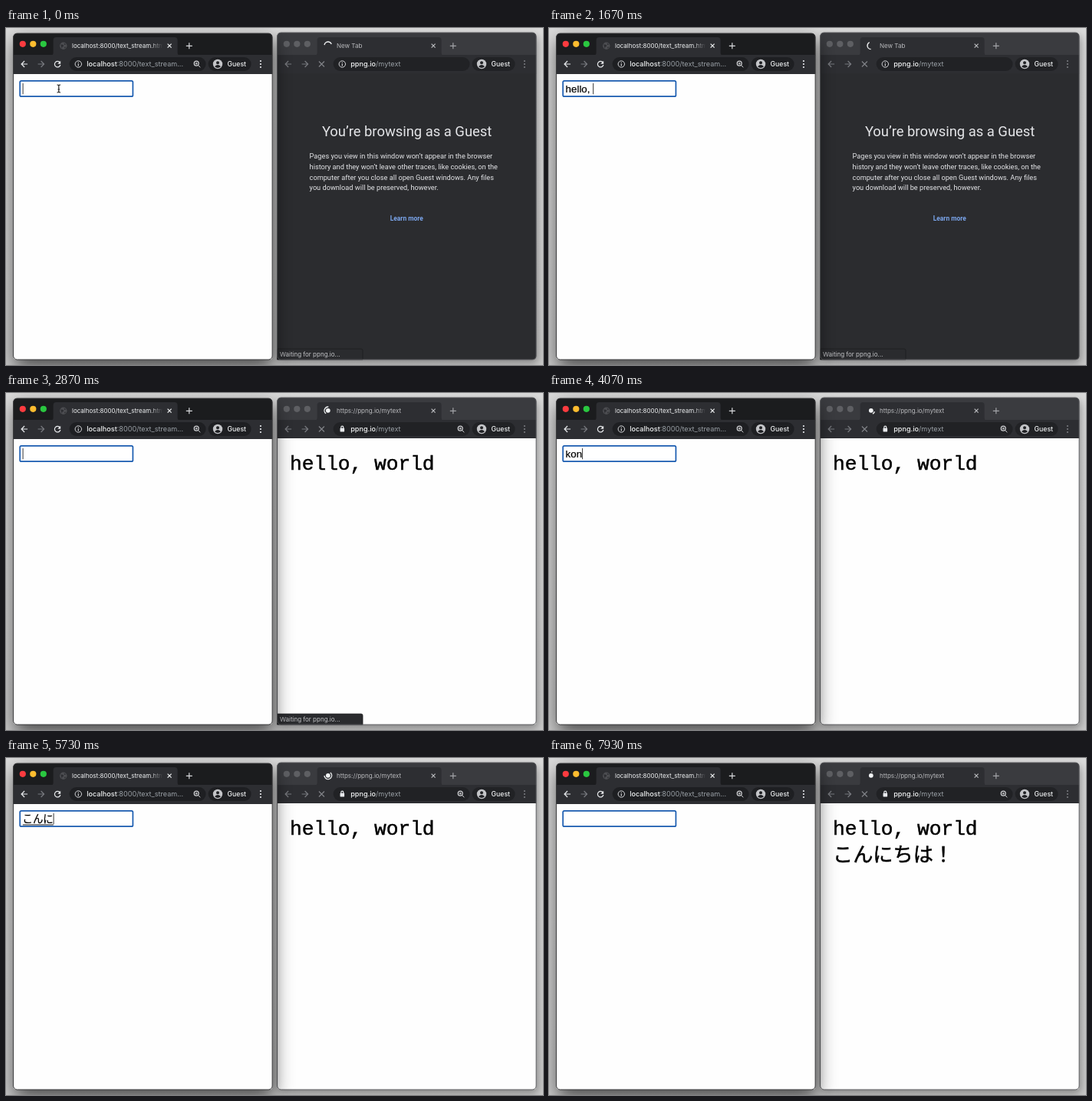
Animation of 700x439 px, one loop 8000 ms. Source, as an HTML page:

```html
<!DOCTYPE html>
<html lang="en">
<head>
<meta charset="utf-8">
<title>Text stream</title>
<style>
html, body { margin: 0; width: 100%; height: 100%; overflow: hidden; background: #d6d6d6; }
svg { display: block; width: 100%; height: 100%; }
text { white-space: pre; font-family: Inter, sans-serif; }
.tab { font-size: 8px; }
.url { font-size: 9.1px; fill: #9aa0a6; }
.strong { font-weight: 500; fill: #f1f3f4; }
.line { fill: none; stroke-width: 1.2; }
.guest text { font-family: Roboto, sans-serif; fill: #e4e5e8; font-size: 9.2px; }
.guest .title { font-size: 18.4px; }
.guest .link { font-size: 8.4px; font-weight: 600; fill: #7ba6ec; }
#typed { font: 13.33px "Liberation Sans", "Noto Sans CJK JP", sans-serif; stroke: #000; stroke-width: .2; }
.output { font: 26.2px "Liberation Mono", "Noto Sans CJK JP", monospace; stroke: #000; stroke-width: .5; }
</style>
</head>
<body>
<svg id="stage" viewBox="0 0 700 439"></svg>
<script>
const LOOP = 8000;
const NAVIGATE = 2730, FIRST_LINE = 2860, STATUS_HIDE = 3330, SECOND_LINE = 7270;

// Each entry: [time, field text, being composed]
const typing = (start, step, states, composing = false) =>
  states.map((text, i) => [start + i * step, text, composing]);
const prefixes = text => [...text].map((_, i) => text.slice(0, i + 1));
const keys = [
  [0, ''],
  ...typing(800, 133, prefixes('hello, world')),
  [2665, ''],
  ...typing(3730, 133, prefixes('kon')),
  ...typing(4460, 100, ['ko', 'k', '']),
  ...typing(5060, 140, ['k', 'こ', 'こn', 'こんn', 'こんに', 'こんにc', 'こんにch', 'こんにち'], true),
  ...typing(6260, 160, ['こんにちh', 'こんにちは', 'こんにちは！'], true),
  [7060, 'こんにちは！'],
  [7250, '']
];

const dark = '#2d2e32';

const cross = (x, y, r, color) =>
  `<path class="line" stroke="${color}" d="M${x - r} ${y - r}l${2 * r} ${2 * r}m0 ${-2 * r}l${-2 * r} ${2 * r}"/>`;

const backArrow = color =>
  `<path class="line" stroke="${color}" d="M10.5 47h8m-4 -4l-4 4l4 4"/>`;

const forwardArrow = color =>
  `<path class="line" stroke="${color}" d="M32 47h8m-4 -4l4 4l-4 4"/>`;

const infoIcon = `<g class="line" stroke="#d4d5d8"><circle cx="84.7" cy="47" r="4.2" stroke-width="1"/>
  <path d="M84.7 46.4v3M84.7 44.4v1.1"/></g>`;

const lockIcon = `<rect x="81.9" y="45.8" width="5.6" height="4.6" rx=".6" fill="#e8eaed"/>
  <path class="line" stroke="#e8eaed" stroke-width="1" d="M83.2 46v-1.3a1.5 1.5 0 0 1 3 0V46"/>`;

const zoomIcon = `<g class="line" stroke="#cfd0d3"><circle cx="238.6" cy="46.2" r="3"/>
  <path d="M240.9 48.5l2.8 2.8M237.1 46.2h3M238.6 44.7v3" stroke-width="1"/></g>`;

const reloadIcon = `<path class="line" stroke="#e8eaed" d="M60.8 45.1A3.8 3.8 0 1 0 61.3 48"/>
  <path fill="#e8eaed" d="M61.6 42.8v3.9h-3.9z"/>`;

const globe = `<circle cx="65.2" cy="23.3" r="4.7" fill="#4c4d51"/>
  <path fill="${dark}" d="M61.7 21.5l3 .3l1 1.6l-2 1.3l-.6 2zM66.2 19.5l2.4 2l-2.2 .6zM66.2 25l2.5 -.6l-1.4 2.4z"/>`;

const pagePath = top => `M0 ${top}H337.5V428q0 4 -4 4H4q-4 0 -4 -4z`;

function browser({ x, top, pageTop, active, page, tab, address }) {
  const strong = active ? '#f1f3f4' : '#b9babd';
  const weak = '#77797e';
  const icon = active ? '#e8eaed' : weak;
  const pill = active ? '#1e1f22' : '#212225';
  const lights = active ? ['#fc3b3f', '#fdbc2f', '#2ac740'] : Array(3).fill('#5e5f63');
  return `<g transform="translate(${x} 0)">
    <rect y="${top}" width="337.5" height="${432 - top}" rx="5" fill="${dark}"
      filter="url(#${active ? 'deep' : 'soft'})"/>
    <path fill="${active ? '#1b1c1e' : '#3a3b3f'}" d="M0 36V${top + 5}q0 -5 5 -5h327.5q5 0 5 5V36z"/>
    <path fill="${dark}" d="M48 36q4 0 4 -4V16q0 -4 4 -4h154q4 0 4 4v16q0 4 4 4z"/>
    <rect y="35" width="337.5" height="25" fill="${dark}"/>
    ${lights.map((c, i) => `<circle cx="${12.2 + i * 13.5}" cy="20.8" r="4.1" fill="${c}"/>`).join('')}
    ${cross(203.5, 23.2, 2.5, strong)}
    <path class="line" stroke="${active ? '#d8d9dc' : '#a2a3a7'}" d="M225.2 23.3h8m-4 -4v8"/>
    ${backArrow(icon)}${forwardArrow(weak)}
    ${active ? reloadIcon : cross(57.8, 47, 3.5, '#808287')}
    <rect x="73" y="38" width="178" height="18" rx="9" fill="${pill}"/>
    <rect x="254" y="38" width="56" height="18" rx="9" fill="${pill}"/>
    <circle cx="266.4" cy="47" r="6.2" fill="#c4c5c8"/>
    <circle cx="266.4" cy="45.2" r="2" fill="${pill}"/>
    <path fill="${pill}" d="M262.4 50.3q4 -4.4 8 0q-4 3.4 -8 0z"/>
    <text class="strong" x="279" y="50.3" font-size="8.7">Guest</text>
    ${[43, 47, 51].map(y => `<circle cx="322.3" cy="${y}" r="1.1" fill="${icon}"/>`).join('')}
    <g fill="${strong}">${tab}</g>${address}
    <path fill="#fefefe" d="${pagePath(pageTop)}"/>
    ${page}
    <rect y="${top}" width="337.5" height="${432 - top}" rx="5" fill="none"
      stroke="${active ? '#39393b' : '#5c5d60'}"/>
  </g>`;
}

const urlText = (host, path) =>
  `<text class="url" x="95.6" y="50.3"><tspan class="strong">${host}</tspan>${path}</text>`;

const guestLines = [
  'Pages you view in this window won’t appear in the browser',
  'history and they won’t leave other traces, like cookies, on the',
  'computer after you close all open Guest windows. Any files',
  'you download will be preserved, however.'
];

const receiver = browser({
  x: 353.6, top: 6, pageTop: 59, active: false,
  tab: `<text class="tab" id="tabTitle" x="77.4" y="26"></text>
    <circle id="favicon" cx="66.2" cy="22.8" r="2.9" fill="#f1f3f4"/>
    <circle id="spinner" r="4.8" fill="none" stroke="#f1f3f4" stroke-width="1.4" pathLength="360"/>`,
  address: `${urlText('ppng.io', '/mytext')}<g id="insecure">${infoIcon}</g>
    <g id="secure">${lockIcon}${zoomIcon}</g>`,
  page: `<g id="guestPage" class="guest">
      <path fill="#2b2c2f" d="${pagePath(59)}"/>
      <text class="title" x="58.3" y="141.3">You’re browsing as a Guest</text>
      ${guestLines.map((s, i) => `<text x="42" y="${170.3 + i * 13.6}">${s}</text>`).join('')}
      <text class="link" x="147.2" y="251.2">Learn more</text>
    </g>
    <text class="output" id="line1" x="16.4" y="100">hello, world</text>
    <text class="output" id="line2" x="16.4" y="135">こんにちは！</text>
    <g id="status"><path fill="#2a2b2e" stroke="#1d1e20" stroke-width=".8" d="M0 432V418H109.4q2 0 2 2V432z"/>
      <text class="tab" x="3.4" y="428.3" fill="#c3c4c7">Waiting for ppng.io...</text></g>`
});

const sender = browser({
  x: 9.6, top: 7, pageTop: 60, active: true,
  tab: `${globe}<text class="tab" x="76.4" y="26">localhost:8000/text_stream.htm</text>
    <rect x="178" y="14" width="21" height="18" fill="url(#fade)"/>`,
  address: urlText('localhost', ':8000/text_stream...') + infoIcon + zoomIcon,
  page: `<rect x="8.6" y="68.8" width="147.2" height="20.4" rx="1.8" fill="#fff" stroke="#195bb0" stroke-width="1.7"/>
    <text id="typed" x="12" y="83.6"></text>
    <path id="underline" stroke="#111" stroke-width="1.2"/>
    <path id="caret" stroke="#222" stroke-width=".9"/>
    <path id="pointer" class="line" stroke="#222" stroke-width="1"
      d="M56.9 74q2 0 2.3 1q.3 -1 2.3 -1M59.2 75v8M56.9 84q2 0 2.3 -1q.3 1 2.3 1M57.9 80h2.6"/>`
});

document.getElementById('stage').innerHTML = `<defs>
  <linearGradient id="backdrop" x2="0" y2="1"><stop stop-color="#dadada"/><stop offset="1" stop-color="#cacaca"/></linearGradient>
  <linearGradient id="fade"><stop stop-color="${dark}" stop-opacity="0"/><stop offset=".8" stop-color="${dark}"/></linearGradient>
  <filter id="deep" x="-20%" y="-20%" width="140%" height="140%"><feDropShadow dy="10" stdDeviation="12" flood-opacity=".65"/></filter>
  <filter id="soft" x="-20%" y="-20%" width="140%" height="140%"><feDropShadow dy="5" stdDeviation="6" flood-opacity=".35"/></filter>
  </defs><rect width="700" height="439" fill="url(#backdrop)"/>${receiver}${sender}`;

const el = id => document.getElementById(id);
const show = (id, visible) => el(id).setAttribute('visibility', visible ? 'visible' : 'hidden');
const setText = (id, text) => { if (el(id).textContent !== text) el(id).textContent = text; };

// Waiting: fixed arc, counterclockwise. Loading: arc grows and shrinks clockwise.
function spinnerArc(t) {
  if (t < FIRST_LINE + 70) return [188 - 360 * t / 1320, 150];
  const elapsed = t - 1900, period = 666, arc = 270;
  const cycle = Math.floor(elapsed / period), f = elapsed / period - cycle;
  const start = 330 + 360 * elapsed / 1568 + Math.floor(cycle / 2) % 4 * arc;
  const sweep = arc * f * f * (3 - 2 * f) - (cycle % 2 ? 0 : arc);
  const length = Math.max(15, Math.abs(sweep));
  return [sweep < 0 ? start - length : start, length];
}

function drawField(t) {
  const [since, text, composing] = keys.findLast(key => key[0] <= t);
  setText('typed', text);
  const left = 12.2, right = left + (text ? el('typed').getComputedTextLength() : 0);
  el('caret').setAttribute('d', `M${right + .3} 72V86.3`);
  el('underline').setAttribute('d', `M${left} 87H${right}`);
  show('caret', Math.floor((t - since) / 500) % 2 === 0);
  show('underline', composing);
  show('pointer', t < 800);
}

function draw(t) {
  drawField(t);
  const navigated = t >= NAVIGATE;
  setText('tabTitle', navigated ? 'https://ppng.io/mytext' : 'New Tab');
  show('favicon', navigated);
  show('secure', navigated);
  show('insecure', !navigated);
  show('guestPage', t < FIRST_LINE);
  show('line1', t >= FIRST_LINE);
  show('line2', t >= SECOND_LINE);
  show('status', t < STATUS_HIDE);
  const [angle, length] = spinnerArc(t);
  el('spinner').setAttribute('transform', `translate(66.2 22.8) rotate(${angle})`);
  el('spinner').setAttribute('stroke-dasharray', `${length} ${360 - length}`);
}

const begin = performance.now();
function frame() {
  draw((performance.now() - begin) % LOOP);
  requestAnimationFrame(frame);
}
frame();
</script>
</body>
</html>
```
